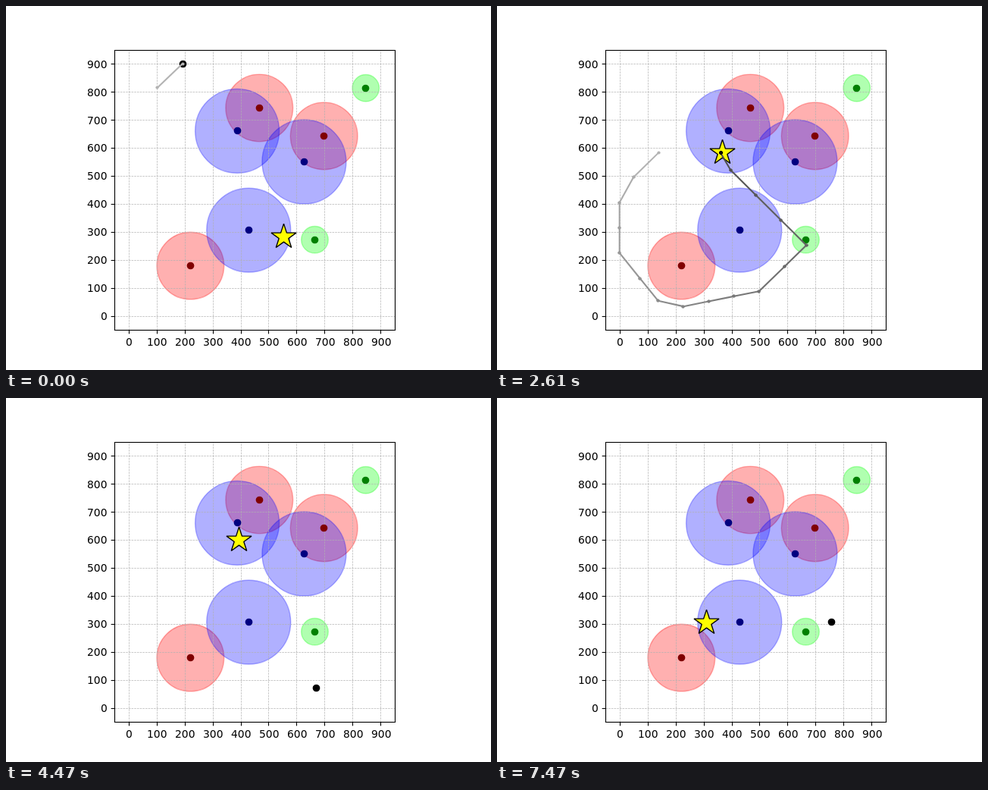
Animation of 640 by 480 pixels, one loop 7500 ms. Source, as an HTML page with a canvas:

```html
<!DOCTYPE html>
<html>
<head>
<meta charset="utf-8">
<style>
html, body { margin: 0; width: 100%; height: 100%; overflow: hidden; background: #fff; }
canvas { display: block; }
</style>
</head>
<body>
<canvas id="stage" width="640" height="480"></canvas>
<script>
const ctx = document.getElementById('stage').getContext('2d');
const FRAME_MS = 30, FRAMES = 250, EPISODE = 50, STRIDE = 90;
const SCALE = 0.3696, PT = 100 / 72;
const px = x => 161.68 + x * SCALE;
const py = y => 408.72 - y * SCALE;
const snap = v => Math.floor(v + 0.5) + 0.5;
const center = v => Math.floor(v) + 0.5;
const LEFT = 143.5, TOP = 58.5, RIGHT = 513.5, BOTTOM = 427.5;

const zones = [
  { rgb: '255,0,0', dot: '#800000', r: 120, at: [[467, 742], [698, 642], [221, 179]] },
  { rgb: '0,0,255', dot: '#000080', r: 150, at: [[388, 660], [627, 550], [429, 306]] },
  { rgb: '0,255,0', dot: '#008000', r: 48, at: [[847, 813], [665, 272]] }
];

// Turning points of each walk; every walk ends at its star.
const gate = [667, 252], inner = [397, 520];
const episodes = [
  walk([554.5, 283], [103, 814], [193, 900], [642, 900], [823, 819], [900, 730], [900, 638]),
  walk([368, 581], [139, 582], [50, 495], [0, 405], [0, 224], [138, 54], [228, 34], [498, 88],
    gate, inner),
  walk([91, 818], [105, 469], [16, 380], [0, 201], [171, 22], [262, 0], [352, 22], [533, 94],
    [622, 164], gate, inner, [216, 570], [150, 655]),
  walk([394.5, 599], [670, 72], gate, inner),
  walk([760, 420], [330, 80], gate),
  walk([311, 304], [757, 307])
];

// Each step covers at most STRIDE on its longer axis.
function walk(star, ...turns) {
  const points = [turns[0]];
  turns.push([star[0] - 7, star[1]]);
  for (let i = 1; i < turns.length; i++) {
    const [x, y] = turns[i - 1], dx = turns[i][0] - x, dy = turns[i][1] - y;
    const steps = Math.max(Math.abs(dx), Math.abs(dy)) / STRIDE;
    for (let k = 1; k < steps + 0.9; k++) {
      const t = Math.min(1, k / steps);
      points.push([x + dx * t, y + dy * t]);
    }
  }
  return { star, points };
}

function line(x0, y0, x1, y1) {
  ctx.beginPath();
  ctx.moveTo(x0, y0);
  ctx.lineTo(x1, y1);
  ctx.stroke();
}

function disc(x, y, r, color) {
  ctx.fillStyle = color;
  ctx.beginPath();
  ctx.arc(x, y, r, 0, 2 * Math.PI);
  ctx.fill();
}

function marker([x, y], r, color) {
  disc(center(px(x)), center(py(y)), r, color);
}

function drawZones() {
  ctx.lineWidth = PT;
  for (const z of zones)
    for (const [x, y] of z.at) {
      ctx.strokeStyle = `rgba(${z.rgb},0.31)`;
      disc(px(x), py(y), z.r * SCALE, ctx.strokeStyle);
      ctx.stroke();
    }
}

function drawGrid() {
  ctx.strokeStyle = '#b0b0b0';
  ctx.lineWidth = 0.69;
  ctx.setLineDash([2.57, 1.11]);
  for (let v = 0; v <= 900; v += 100) {
    line(snap(px(v)), BOTTOM, snap(px(v)), TOP);
    line(LEFT, snap(py(v)), RIGHT, snap(py(v)));
  }
  ctx.setLineDash([]);
}

function drawStar([x, y]) {
  ctx.beginPath();
  for (let i = 0; i < 10; i++) {
    const r = i % 2 ? 6.63 : 17.36, a = i * Math.PI / 5;
    ctx.lineTo(center(px(x)) + r * Math.sin(a), center(py(y)) - r * Math.cos(a));
  }
  ctx.closePath();
  ctx.fillStyle = '#ff0';
  ctx.strokeStyle = '#000';
  ctx.lineWidth = PT;
  ctx.lineJoin = 'bevel';
  ctx.fill();
  ctx.stroke();
}

function drawTrail(pointAt, count) {
  ctx.lineWidth = 1.5 * PT;
  ctx.lineCap = 'square';
  for (let i = 0; i < count - 1; i++) {
    const a = pointAt(i), b = pointAt(i + 1);
    const g = Math.round(255 * Math.max(0, 0.7 - i / count));
    const color = ctx.strokeStyle = `rgb(${g},${g},${g})`;
    if (a !== b) line(px(a[0]), py(a[1]), px(b[0]), py(b[1]));
    marker(a, 2.1, color);
    marker(b, 2.1, color);
  }
  ctx.lineCap = 'butt';
}

function drawAxes() {
  ctx.strokeStyle = ctx.fillStyle = '#000';
  ctx.lineWidth = 0.8 * PT;
  ctx.lineJoin = 'miter';
  ctx.strokeRect(LEFT, TOP, RIGHT - LEFT, BOTTOM - TOP);
  ctx.font = `${10 * PT}px "DejaVu Sans", sans-serif`;
  for (let v = 0; v <= 900; v += 100) {
    const x = snap(px(v)), y = snap(py(v)), w = ctx.measureText(v).width;
    line(x, BOTTOM, x, BOTTOM + 4.86);
    line(LEFT, y, LEFT - 4.86, y);
    ctx.fillText(v, Math.ceil(px(v) - w / 2), 448);
    ctx.fillText(v, Math.ceil(133.48 - w), Math.round(py(v) + 5.5));
  }
}

function draw(frame) {
  const { star, points } = episodes[Math.floor((frame + 1) / EPISODE)];
  const count = (frame + 1) % EPISODE + 1;
  const pointAt = i => points[Math.min(i, points.length - 1)];
  ctx.fillStyle = '#fff';
  ctx.fillRect(0, 0, 640, 480);
  drawZones();
  drawGrid();
  for (const z of zones) z.at.forEach(c => marker(c, 4.86, z.dot));
  marker(pointAt(count - 1), 4.86, '#000');
  drawStar(star);
  drawTrail(pointAt, count);
  drawAxes();
}

const start = performance.now();
function tick() {
  draw(Math.floor((performance.now() - start) / FRAME_MS) % FRAMES);
  requestAnimationFrame(tick);
}
tick();
</script>
</body>
</html>
```
